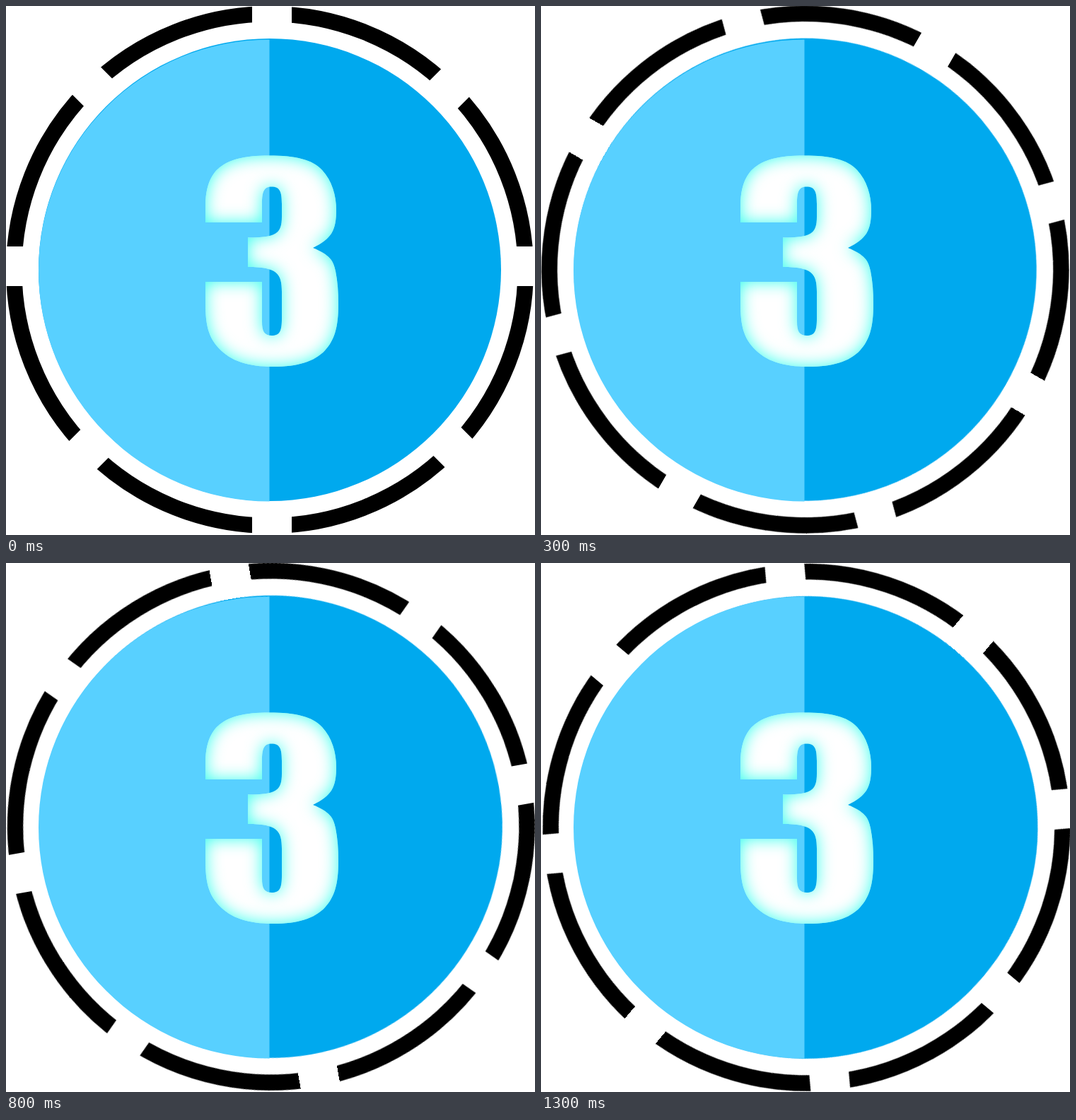
These frames come from a looping animation (748 by 748 pixels, 1400 ms). An HTML page without scripts:

```html
<!DOCTYPE html>
<html lang="en">
<head>
<meta charset="utf-8">
<title>Countdown 3</title>
<style>
  html, body { margin: 0; width: 100%; height: 100%; overflow: hidden; background: #fff; }
  svg { display: block; width: 100%; height: 100%; }
  .dial { transform-origin: 374px 374px; animation: turn 1.4s steps(14) infinite; }
  .ring { fill: none; stroke: #000; stroke-width: 22.5; }
  .gaps { stroke: #fff; stroke-width: 56; }
  .dark { fill: #00a9ee; }
  .light { fill: #58d0ff; }
  .digit { fill: #fff; filter: url(#glow); }
  @keyframes turn { to { transform: rotate(140deg); } }
</style>
</head>
<body>
<svg viewBox="0 0 748 748" role="img" aria-label="3">
  <defs>
    <!-- Aqua glow running inwards from the edge of the digit -->
    <filter id="glow" filterUnits="userSpaceOnUse" x="220" y="150" width="310" height="420" color-interpolation-filters="sRGB">
      <feFlood flood-color="#38ffee"/>
      <feComposite operator="out" in2="SourceAlpha"/>
      <feGaussianBlur stdDeviation="11.5"/>
      <feComposite operator="in" in2="SourceAlpha" result="rim"/>
      <feMerge>
        <feMergeNode in="SourceGraphic"/>
        <feMergeNode in="rim"/>
      </feMerge>
    </filter>
    <path id="bar" d="M376 -40V776"/>
  </defs>

  <g class="dial">
    <circle class="ring" cx="373" cy="373" r="361.75"/>
    <g class="gaps">
      <use href="#bar"/>
      <use href="#bar" transform="rotate(45 376 368)"/>
      <use href="#bar" transform="rotate(90 376 368)"/>
      <use href="#bar" transform="rotate(135 376 368)"/>
    </g>
    <circle class="dark" cx="373" cy="373" r="327"/>
  </g>

  <path class="light" d="M372.5 47.5A326.5 326.5 0 0 0 372.5 700.5Z"/>

  <path class="digit" d="M282 306V284C282 258 288 242 299 231C314 217 336 211.500 372 211.500
    C410 211.500 433 217 447 232C461 247 467 268 467 288C467 318 460 329 434 342
    C458 352 463 360 466 375C469 390 470 405 470 422C470 455 464 473 451 487
    C436 503 412 510 378 510C342 510 318 502 301 484C284 466 282 445 282 418
    V390H362V446C362 460 365 466 376 466C387 466 390 460 390 442V404
    C390 378 383 369 342 369V327.500C382 327.500 390 322 390 298V280
    C390 262 387 255.500 375.500 255.500C365 255.500 362 262 362 280V306Z"/>
</svg>
</body>
</html>
```
